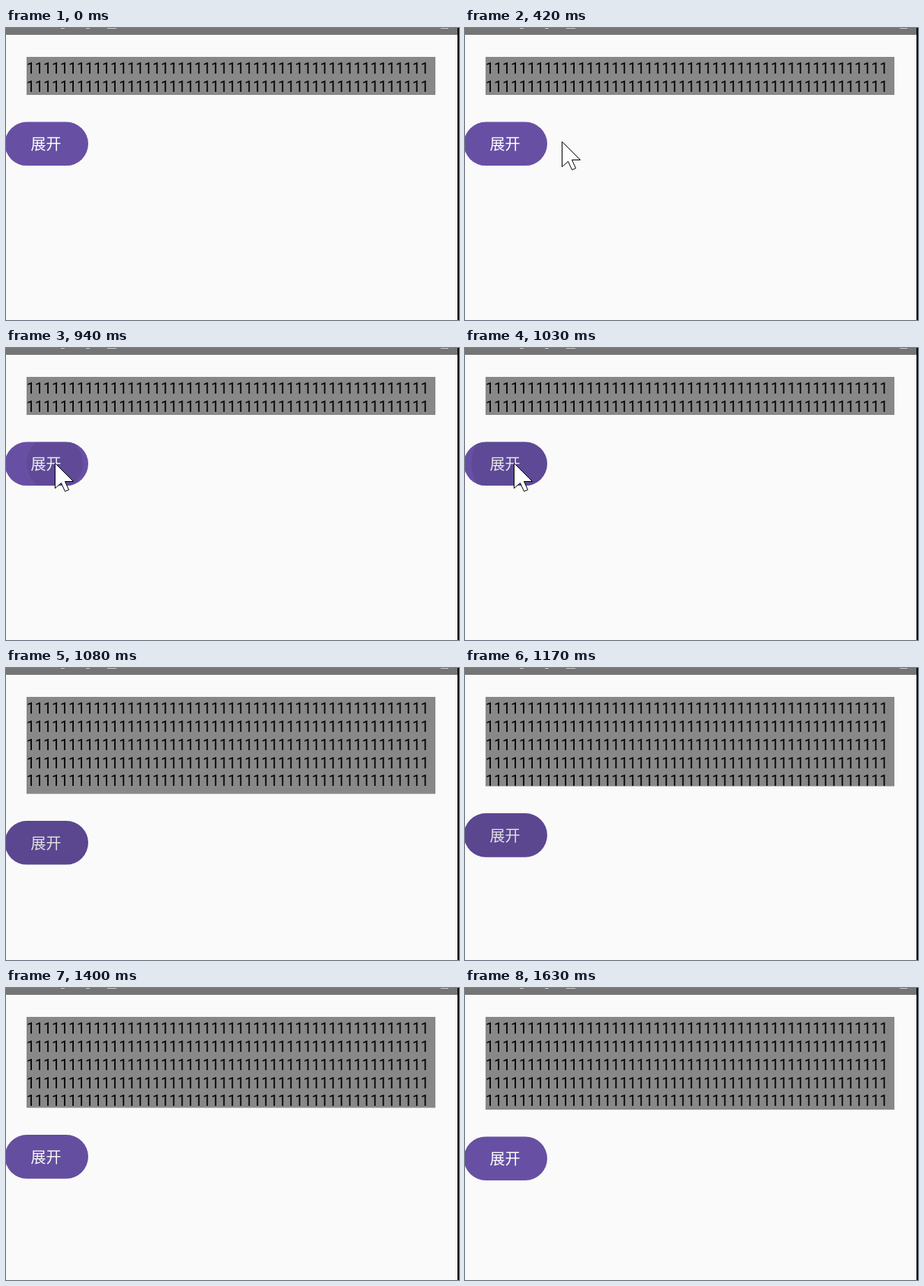
Animation of 595 by 384 pixels, one loop 2.35 s. Source, as an HTML page with a canvas:

```html
<!DOCTYPE html>
<html lang="zh">
<head>
<meta charset="utf-8">
<style>
  html, body { margin: 0; width: 100%; height: 100%; overflow: hidden; background: #fafafa; }
  canvas { display: block; }
</style>
</head>
<body>
<canvas id="stage" width="595" height="384"></canvas>
<script>
const ctx = document.getElementById('stage').getContext('2d');
const LOOP = 2350;
const ENTER = 270, PRESS = 940, RELEASE = 1033, SETTLED = 1480;
const BOX = { x: 27, y: 38, w: 537, closed: 88, open: 159.3 };
const TEXT = '1'.repeat(48);

const clamp01 = v => Math.min(1, Math.max(0, v));
const hold = (t, start, step) => start + Math.floor((t - start) / step) * step;

// Underdamped spring (damping ratio 0.2, stiffness 1500), advanced in 60 Hz display frames.
function boxBottom(t) {
  const s = Math.max(0, Math.round((t - RELEASE) * 0.06)) / 60;
  const zeta = 0.2, omega = Math.sqrt(1500);
  const damped = omega * Math.sqrt(1 - zeta * zeta);
  const swing = Math.cos(damped * s) + zeta * omega / damped * Math.sin(damped * s);
  return BOX.open - (BOX.open - BOX.closed) * Math.exp(-zeta * omega * s) * swing;
}

// The pointer rises from below, turns left above the button and drops onto it.
function pointerAt(t) {
  const rise = clamp01((t - ENTER) / 150);
  const cross = clamp01((t - 420) / 220);
  const drop = clamp01((t - 640) / 120);
  return [
    157 - 30 * rise - 68 * cross + 5 * drop,
    334 - 185 * rise - 24 * Math.sin(cross * Math.PI) - 9 * cross + 11 * drop
  ];
}

function drawScreen() {
  ctx.fillStyle = '#fafafa';
  ctx.fillRect(0, 0, 595, 384);
  ctx.fillStyle = '#757575';
  ctx.fillRect(0, 0, 593, 9);
  ctx.fillStyle = '#ccc';
  for (const [x, w] of [[72, 5], [105, 5], [133, 12], [571, 10]]) ctx.fillRect(x, 0, w, 1);
  ctx.fillStyle = '#000';
  ctx.fillRect(593, 0, 2, 384);
}

function drawBox(bottom, lines) {
  ctx.save();
  ctx.beginPath();
  ctx.rect(BOX.x, BOX.y, BOX.w, bottom - BOX.y);
  ctx.fillStyle = '#888';
  ctx.fill();
  ctx.clip();
  ctx.fillStyle = '#000';
  ctx.font = '19.6px Roboto, sans-serif';
  for (let i = 0; i < lines; i++) ctx.fillText(TEXT, BOX.x, 59.75 + i * 23.93);
  ctx.restore();
}

function drawRipple(x, y, t) {
  const age = t - PRESS;
  const fade = clamp01((SETTLED - t) / 310);
  if (age < 0 || fade === 0) return;
  ctx.beginPath();
  ctx.arc(x, y, 37 + 0.4 * age, 0, Math.PI * 2);
  ctx.fillStyle = `rgba(0,0,0,${0.12 * clamp01(0.6 + age / 250) * fade})`;
  ctx.fill();
}

function drawButton(top, t) {
  ctx.save();
  ctx.beginPath();
  ctx.roundRect(-1.5, top, 109.5, 57.6, 28.8);
  ctx.fillStyle = '#6750a4';
  ctx.fill();
  ctx.clip();
  ctx.fillStyle = '#fff';
  ctx.font = '20px "Noto Sans CJK SC", "Noto Sans CJK", sans-serif';
  ctx.fillText('展开', 32.6, top + 36.6);
  drawRipple(64, top + 28, t);
  ctx.restore();
}

function drawPointer(x, y) {
  ctx.save();
  ctx.translate(Math.round(x) + 0.5, Math.round(y) + 0.5);
  ctx.beginPath();
  for (const [px, py] of [[0, 0], [0, 33], [8, 26], [13, 37], [18, 35], [13, 24], [24, 24]]) ctx.lineTo(px, py);
  ctx.closePath();
  ctx.fillStyle = '#fff';
  ctx.fill();
  ctx.strokeStyle = '#000';
  ctx.stroke();
  ctx.restore();
}

function render() {
  const now = performance.now() % LOOP;
  const t = now < PRESS ? hold(now, ENTER, 50) : hold(now, PRESS, 46);
  const bottom = boxBottom(t);
  drawScreen();
  drawBox(bottom, bottom > BOX.closed ? 5 : 2);
  drawButton(bottom + 35.5, t);
  if (t >= ENTER && t < RELEASE) drawPointer(...pointerAt(t));
  requestAnimationFrame(render);
}
render();
</script>
</body>
</html>
```
